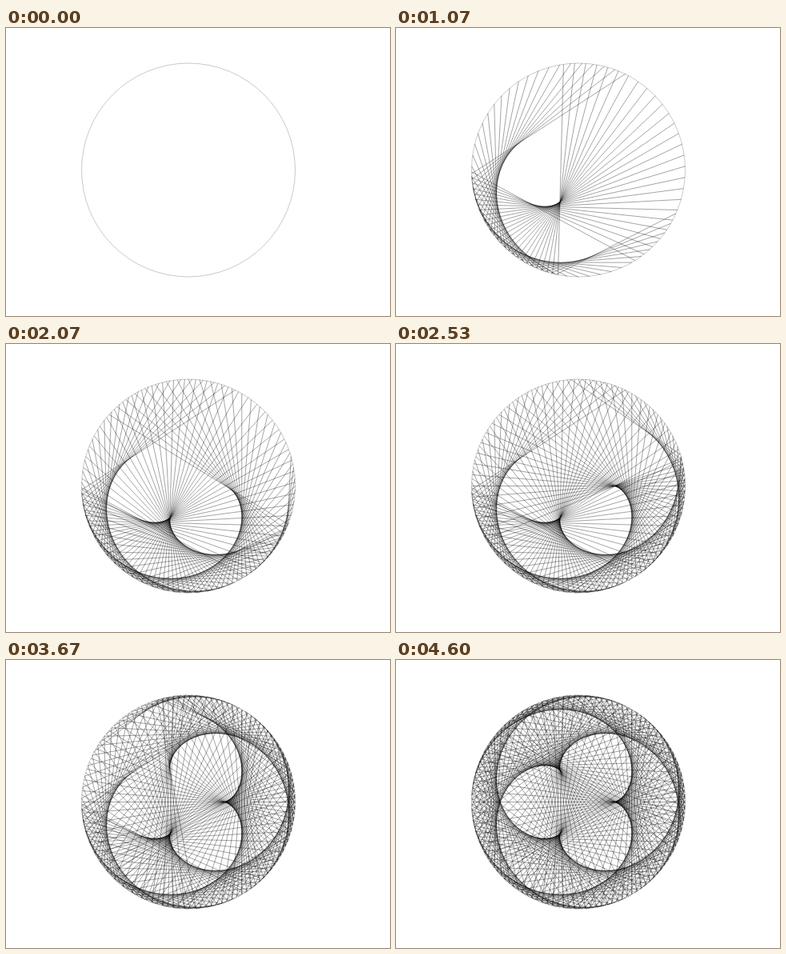
An HTML page that plays this animation: 480 by 360 pixels, repeating every 4.67 s.

```html
<!DOCTYPE html>
<html lang="en">
<head>
<meta charset="utf-8">
<title>Three cardioids</title>
<style>
html, body { margin: 0; width: 100%; height: 100%; overflow: hidden; background: #fff; }
svg { display: block; width: 100%; height: 100%; }
</style>
</head>
<body>
<svg viewBox="0 0 480 360" fill="none">
  <circle cx="228" cy="177.5" r="133.5" stroke="#a8a49c" stroke-width=".6"/>
  <g id="chords" stroke="#000" stroke-width=".36"></g>
</svg>
<script>
const LOOP = 4670, FPS = 15, LINES = 360, LINES_PER_SECOND = 80;
const CX = 228, CY = 177.5, R = 133.5;
const group = document.getElementById("chords");

function point(deg) {
  const a = deg * Math.PI / 180;
  return [CX + R * Math.cos(a), CY - R * Math.sin(a)];
}

// One end walks by 1 degree per line, the other by 122.
const chords = Array.from({ length: LINES }, (_, k) => {
  const line = document.createElementNS("http://www.w3.org/2000/svg", "line");
  const ends = [...point(180 + k), ...point(180 + 122 * k)];
  ["x1", "y1", "x2", "y2"].forEach((name, i) => line.setAttribute(name, ends[i].toFixed(2)));
  line.style.display = "none";
  group.appendChild(line);
  return line;
});

let shown = 0;

function render(ms) {
  const frame = Math.floor((ms % LOOP + 5) * FPS / 1000);
  const drawn = Math.ceil((frame - 1) * LINES_PER_SECOND / FPS);
  const count = Math.min(LINES, Math.max(0, drawn));
  if (count === shown) return;
  chords.forEach((line, k) => { line.style.display = k < count ? "" : "none"; });
  shown = count;
}

const start = performance.now();
function tick() {
  render(performance.now() - start);
  requestAnimationFrame(tick);
}
tick();
</script>
</body>
</html>
```
